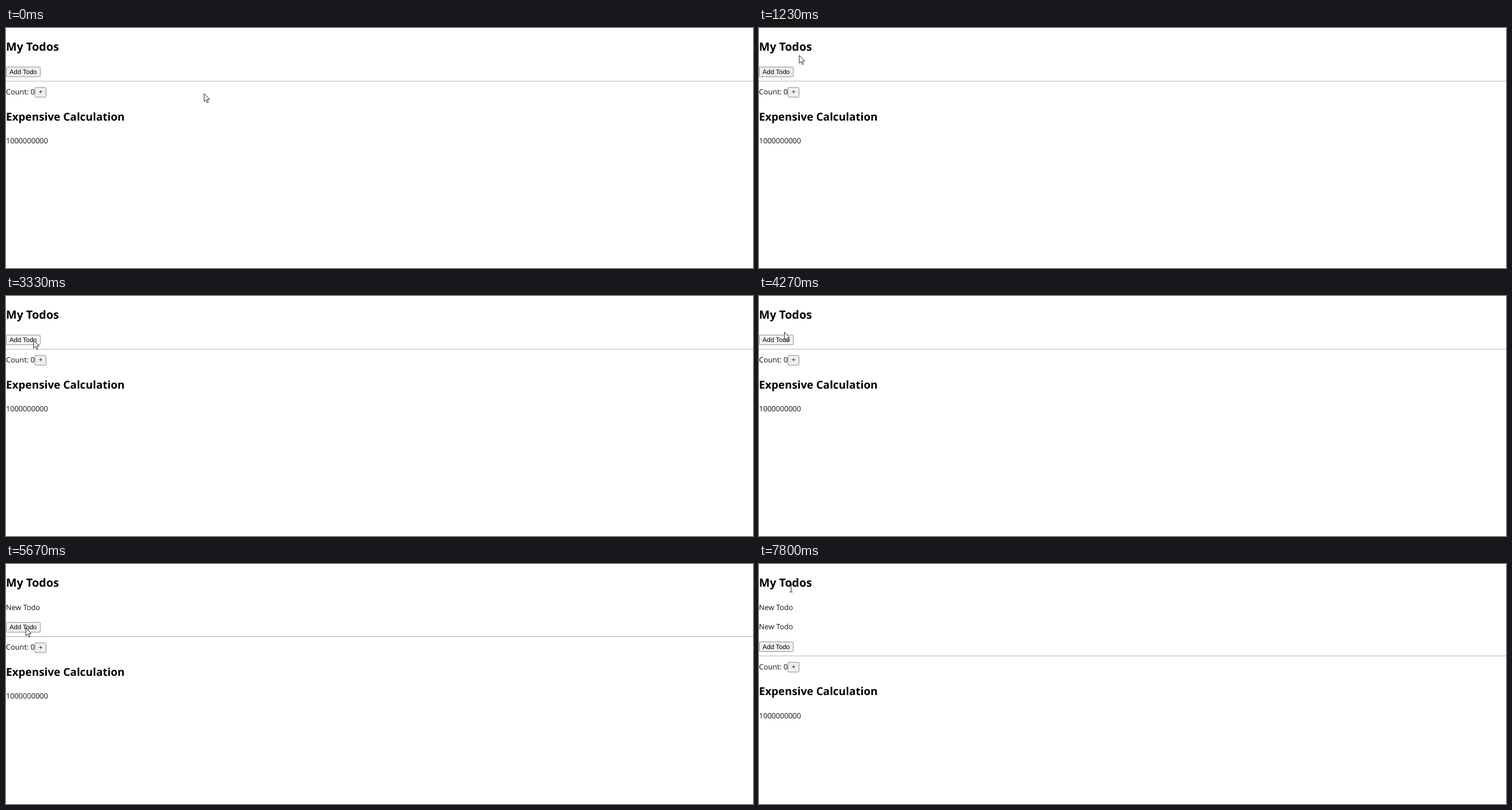
Animation, 1280 px wide and 412 px high, one loop 8 s. Source, as an HTML page:

```html
<!DOCTYPE html>
<html lang="en">
<head>
<meta charset="utf-8">
<title>My Todos</title>
<style>
  html, body { margin: 0; width: 100%; height: 100%; overflow: hidden; background: #fff; }
  svg { display: block; width: 1280px; height: 412px; }
  text { font: 12.6px "Open Sans", "Noto Sans", sans-serif; fill: #111; text-rendering: geometricPrecision; }
  .title { font-weight: 700; font-size: 18.7px; fill: #000; }
  .label { font: 11.1px "Liberation Sans", Arial, sans-serif; fill: #000; }
  .button { fill: #efefef; stroke: #767676; stroke-width: .83; }
</style>
</head>
<body>
<svg viewBox="0 0 1280 412">
  <text class="title" y="39" style="font-size:19.5px">My Todos</text>
  <text class="todo" y="78.6">New Todo</text>
  <text class="todo" y="111.9">New Todo</text>
  <g data-y="66.6">
    <rect id="add" class="button" x=".4" y=".4" width="58.5" height="16.7" rx="2"/>
    <text class="label" x="6.1" y="12.4">Add Todo</text>
  </g>
  <g data-y="90.8">
    <rect width="1280" height=".83" fill="#9a9a9a"/>
    <rect y=".83" width="1280" height=".83" fill="#eee"/>
  </g>
  <g data-y="101.7">
    <text y="12.2">Count: 0</text>
    <rect class="button" x="49.6" y=".4" width="19" height="16.7" rx="2"/>
    <text class="label" x="55.9" y="11.8">+</text>
  </g>
  <text class="title" data-y="158.7">Expensive Calculation</text>
  <text data-y="197.9">1000000000</text>
  <path id="arrow" d="M0 0V13.6L3.1 10.8L5.2 15.8L7.3 14.9L5.2 10H9.2Z" fill="#fff" stroke="#111" stroke-width=".9"/>
  <path id="beam" d="M-2.5-6.5H-.6L0-6L.6-6.5H2.5M0-6V6M-2.5 6.5H-.6L0 6L.6 6.5H2.5" fill="none" stroke="#111"/>
</svg>
<script>
const LOOP = 8000, ROW = 100 / 3;
const CLICKS = [2230, 5670], BLOCKED = 2115;  // each click delays the next render

// pointer stops; sway is the size of the S-bend on the way there
const stops = [
  { t: 240, x: 339.5, y: 112.5 },
  { t: 1070, x: 170, y: 110, sway: 75 },
  { t: 1230, x: 69, y: 47 },
  { t: 1600, x: 39.5, y: 74, sway: -12 },
  { t: 2670, x: 39.5, y: 74 },
  { t: 3330, x: 47.5, y: 76, sway: 55 },
  { t: 4270, x: 43.5, y: 62, sway: 32 },
  { t: 5300, x: 37, y: 110, sway: -50 },
  { t: 5440, x: 37, y: 110 },
  { t: 5640, x: 34, y: 109.5 },
  { t: 5840, x: 34, y: 109.5 },
  { t: 6470, x: 52.5, y: 39.5, sway: -12 },
  { t: 7767, x: 52.5, y: 39.5 },
  { t: 7800, x: 55, y: 41.5 }
];

const $ = s => document.querySelector(s);
const all = s => [...document.querySelectorAll(s)];
const add = $('#add'), arrow = $('#arrow'), beam = $('#beam');
const todos = all('.todo'), blocks = all('[data-y]');

function pointer(t) {
  const i = stops.findIndex(s => s.t > t);
  if (i === 0) return stops[0];
  if (i < 0) return stops[stops.length - 1];
  const a = stops[i - 1], b = stops[i], { sway = 0 } = b;
  const u = (t - a.t) / (b.t - a.t), e = u * u * (3 - 2 * u), turn = 2 * Math.PI * e;
  return {
    x: a.x + (b.x - a.x) * e - sway * .4 * (1 - Math.cos(turn)),
    y: a.y + (b.y - a.y) * e + sway * Math.sin(turn)
  };
}

const move = (el, x, y) => el.setAttribute('transform', `translate(${x} ${y})`);
const show = (el, on) => el.style.display = on ? '' : 'none';

function draw(t) {
  const { x, y } = pointer(t);
  const busy = CLICKS.some(c => t >= c && t < c + BLOCKED);
  const count = CLICKS.filter(c => t >= c + BLOCKED).length;
  const shift = count * ROW, top = 66.6 + shift;

  todos.forEach((el, i) => show(el, i < count));
  blocks.forEach(el => move(el, 0, +el.dataset.y + shift));

  const hover = x < 59 && y > top && y < top + 17;
  add.style.fill = busy ? '#f5f5f5' : hover ? '#e5e5e5' : '#efefef';

  // a blocked page cannot change the cursor shape
  const onText = !busy && x < 91 && y > 22 && y < 46;
  show(arrow, !onText);
  show(beam, onText);
  move(arrow, x, y);
  move(beam, x, y);
}

const start = performance.now();
function tick() {
  draw((performance.now() - start) % LOOP);
  requestAnimationFrame(tick);
}
tick();
</script>
</body>
</html>
```
